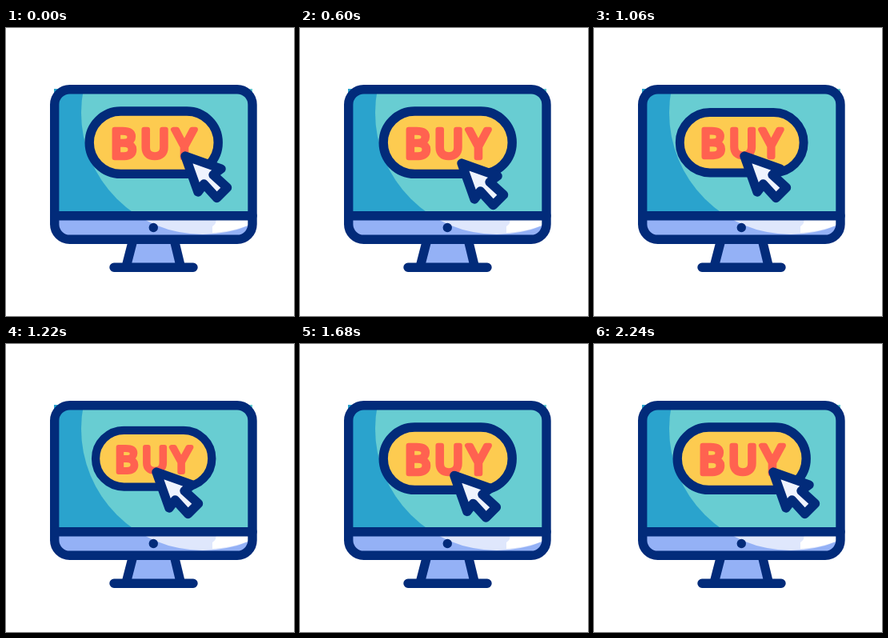
These frames come from a looping animation (360x360 px, 2400 ms). An HTML page:

```html
<!DOCTYPE html>
<html lang="en">
<head>
<meta charset="utf-8">
<title>Buy button</title>
<style>
  html, body { margin: 0; width: 100%; height: 100%; overflow: hidden; background: #fff; }
  svg { display: block; width: 100vw; height: 100vh; }
  .line { stroke: #022b7a; stroke-width: 11.4; stroke-linecap: round; stroke-linejoin: round; }
  .none { fill: none; }
  .label {
    font: 400 49px "Open Sans", "Noto Sans", sans-serif;
    fill: #ff6250; stroke: #ff6250; stroke-width: 6.5; stroke-linejoin: round;
  }
  .button {
    transform-origin: 184.5px 143px;
    animation: press 2400ms cubic-bezier(.333, 0, .667, 1) infinite;
  }
  .cursor {
    transform-box: view-box;
    transform-origin: 0 0;
    offset-path: path("M224 160Q206 179 188 160");
    offset-rotate: 0deg;
    animation: glide 2400ms cubic-bezier(.333, 0, .667, 1) infinite;
  }
  /* The pointer swings in, clicks, and swings back. */
  @keyframes glide {
    0%, 10% { offset-distance: 0%; }
    36.667%, 63.333% { offset-distance: 100%; }
    90%, 100% { offset-distance: 0%; }
  }
  @keyframes press {
    0%, 40% { transform: scale(1); }
    50% { transform: scale(.9); }
    60%, 100% { transform: scale(1); }
  }
</style>
</head>
<body>
<svg viewBox="0 0 360 360">
  <defs>
    <clipPath id="screen"><path d="M60 76H308V235H60Z"/></clipPath>
    <clipPath id="chin"><path d="M60 235H308V245Q308 264 289 264H79Q60 264 60 245Z"/></clipPath>
  </defs>

  <g class="stand">
    <path fill="#94b1f6" d="M158 266H211L218 297H150.5Z"/>
    <path class="line none" d="M158 268L150.5 297M211 268L218 297M135 299.2H234"/>
  </g>

  <g class="monitor">
    <g clip-path="url(#screen)">
      <rect x="60" y="76" width="248" height="160" fill="#2aa3cd"/>
      <circle cx="246" cy="106" r="152" fill="#68cdd2"/>
    </g>
    <g clip-path="url(#chin)">
      <rect x="60" y="235" width="248" height="30" fill="#94b1f6"/>
      <circle cx="246" cy="106" r="152" fill="#dfe7fc"/>
      <path fill="#fff" d="M262 238H304V246Q285 254 258 256V248Q264 244 262 238Z"/>
    </g>
    <rect class="line none" x="60.7" y="76.7" width="247.3" height="187.6" rx="19"/>
    <path class="line none" d="M61 234.7H308"/>
    <circle cx="184.3" cy="249.5" r="5.7" fill="#022b7a"/>
  </g>

  <g class="button">
    <rect class="line" x="104.2" y="104" width="161" height="78.4" rx="39.2" fill="#fdcb50"/>
    <text class="label" x="131 168.3 209.3" y="161.9">BUY</text>
  </g>

  <g class="cursor">
    <path class="line" fill="#eff3fe" d="M0 0L45 16L35 23.5L52.5 39.5L39.5 52.5L23.5 35L16 45Z"/>
  </g>
</svg>
</body>
</html>
```
